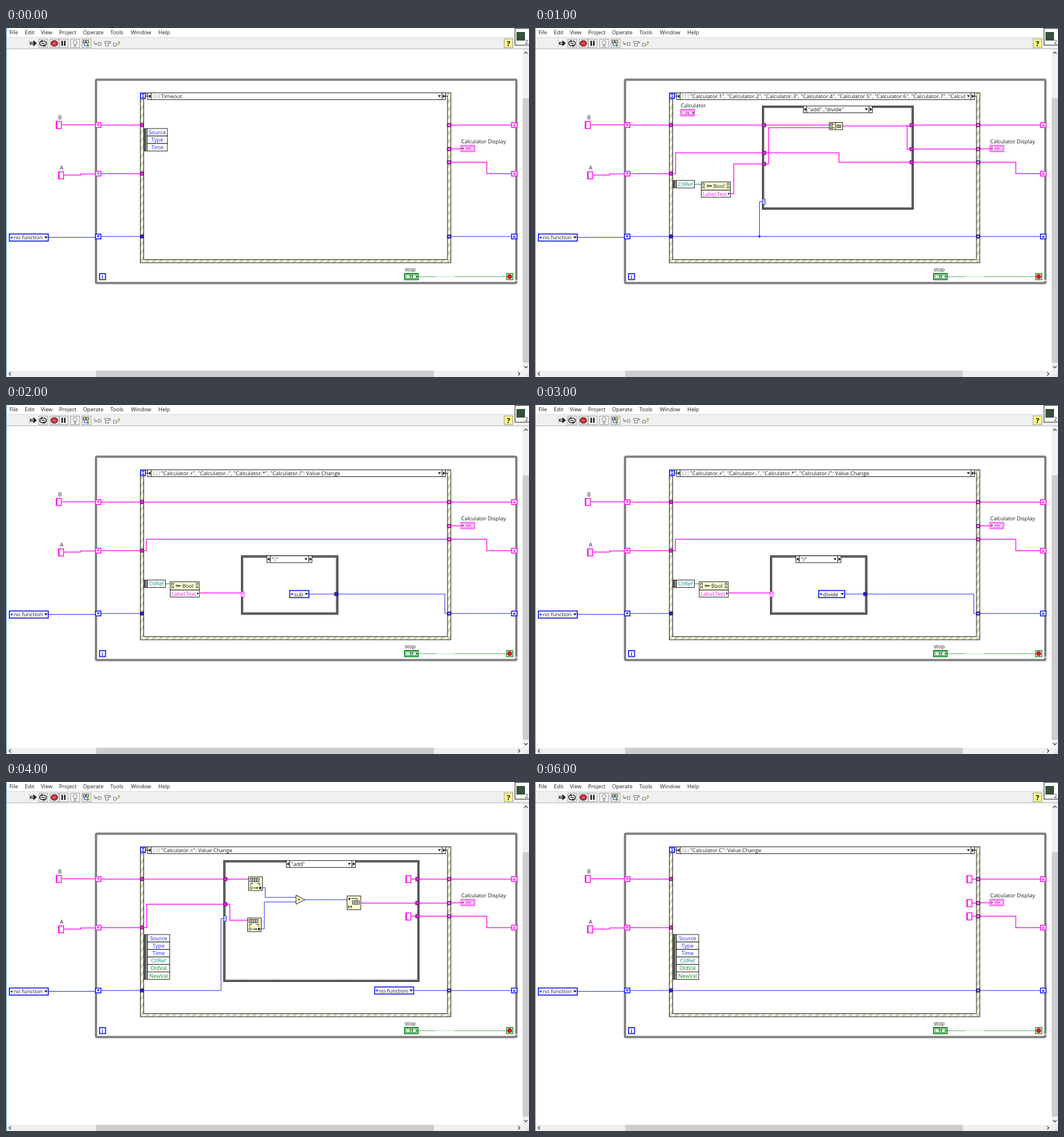
Animation, 917 px wide and 611 px high, one loop 6.5 s. Source, as an HTML page:

```html
<!DOCTYPE html>
<html lang="en">
<head>
<meta charset="utf-8">
<title>Calculator block diagram</title>
<style>
html, body { margin: 0; width: 100%; height: 100%; overflow: hidden; background: #fff; }
svg { display: block; width: 917px; height: 611px; }
text { font-family: "Open Sans", "Noto Sans", sans-serif; font-size: 9.45px; white-space: pre; }
</style>
</head>
<body>
<svg viewBox="0 0 917 611">
  <defs>
    <pattern id="hatch" width="9" height="9" patternUnits="userSpaceOnUse" patternTransform="rotate(40)">
      <rect width="9" height="9" fill="#f8f8e6"/><rect width="4.5" height="9" fill="#d2d2b0"/>
    </pattern>
    <pattern id="check" width="2.6" height="2.6" patternUnits="userSpaceOnUse">
      <rect width="2.6" height="2.6" fill="#333"/>
      <rect width="1.3" height="1.3" fill="#b4b4b4"/><rect x="1.3" y="1.3" width="1.3" height="1.3" fill="#777"/>
    </pattern>
  </defs>
  <g id="frame"></g><g id="scene"></g><g id="ports"></g>
</svg>
<script>
(() => {
const PINK = '#ff1cf0', BLUE = '#1c24f4', TEAL = '#118a8a', GREEN = '#168a24', INK = '#1c1c1c', CREAM = '#ffffd0';
const STEP = 500;
const get = id => document.getElementById(id);

const box = (x, y, w, h, fill = '#fff', stroke = 'none', sw = 1) =>
  `<rect x="${x}" y="${y}" width="${w}" height="${h}" fill="${fill}" stroke="${stroke}" stroke-width="${sw}"/>`;
const line = (pts, color = INK, sw = 1) =>
  `<polyline points="${pts}" fill="none" stroke="${color}" stroke-width="${sw}"/>`;
const poly = (pts, fill = INK, stroke = 'none') => `<polygon points="${pts}" fill="${fill}" stroke="${stroke}"/>`;
const dot = (x, y, r, fill, stroke = 'none') =>
  `<circle cx="${x}" cy="${y}" r="${r}" fill="${fill}" stroke="${stroke}"/>`;
const text = (s, x, y, fill = INK, more = '') => `<text x="${x}" y="${y}" fill="${fill}" ${more}>${s}</text>`;
const mid = (s, x, y, fill, more = '') => text(s, x, y, fill, 'text-anchor="middle" ' + more);
const tiny = (s, x, y, fill, size = 6) => mid(s, x, y, fill, `style="font-size:${size}px;font-weight:700"`);
const str = pts => line(pts, PINK, 1.5);
const num = pts => line(pts, BLUE, 1);

// Triangle pointing right (r), left (l), up (u) or down (d)
function tri(x, y, s, dir, fill = INK) {
  const a = { r: 0, d: 90, l: 180, u: 270 }[dir];
  return `<path d="M${-s * .6} ${-s}L${s * .7} 0L${-s * .6} ${s}Z" fill="${fill}" transform="translate(${x} ${y}) rotate(${a})"/>`;
}
const tunnel = (x, y, color = PINK, hollow) =>
  box(x - 2.9, y - 2.9, 5.8, 5.8, color, '#40104a', 1) + (hollow ? box(x - 1.2, y - 1.2, 2.4, 2.4) : '');
const asker = (x, y, color) => box(x - 2.6, y - 4.4, 5.2, 8.8, '#fff', color) + tiny('?', x, y + 2.6, color, 7);
const register = (x, y, dir, color) =>
  box(x + .8, y - 4.2, 9.6, 8.4, '#fff', color, 1.7) + tri(x + 5.6, y, 2.8, dir, color);
const blank = (x, y) => box(x + 1.2, y - 6.2, 8.8, 12.4, '#fff', PINK, 1.6) + line(`${x + 1.8},${y - 6} ${x + 1.8},${y + 6}`, PINK, 2.4);
const choice = (s, x, y, w) => box(x + .9, y - 6.2, w - 1.8, 12.4, '#fff', BLUE, 1.8) +
  tri(x + 3.7, y, 1.9, 'l', BLUE) + tri(x + 6.3, y, 1.9, 'r', BLUE) + text(s, x + 8.8, y + 3.6) + tri(x + w - 5, y, 2.8, 'd');

function selector(s, x, y, w) {
  return box(x + .5, y + .5, w - 1, 12, '#fff', INK) + line(`${x + 6.5},${y} ${x + 6.5},${y + 12}`) +
    line(`${x + w - 6.5},${y} ${x + w - 6.5},${y + 12}`) + tri(x + 3.4, y + 6.4, 3.2, 'l') +
    tri(x + w - 3, y + 6.4, 3.2, 'r') + tri(x + w - 11, y + 6.4, 2.8, 'd') + text(s, x + 9, y + 10);
}
function caseBox(s, x, y, w, h, sx, sw) {
  return box(x + 2, y + 2, w - 4, h - 4, '#fff', 'url(#check)', 4) +
    box(x + .4, y + .4, w - .8, h - .8, 'none', INK, .8) + selector(s, sx, y, sw);
}
const heading = (n, s) => text(`[${n}]`, 258, 123, '#999') + text(s, 272, 123);

function eventData(names, x, y, w) {
  const h = 13.1;
  let out = box(242.5, y, 2.2, names.length * h, '#888', INK, .8) + box(245.3, y, 2.2, names.length * h, '#ddd', INK, .8);
  names.forEach((n, i) => {
    const color = n === 'CtlRef' ? TEAL : n.endsWith('Val') ? GREEN : BLUE;
    out += box(x, y + i * h, w, h, '#fff', INK) + mid(n, x + w / 2, y + i * h + 10, color);
  });
  return out;
}
const allData = () => eventData(['Source', 'Type', 'Time', 'CtlRef', 'OldVal', 'NewVal'], 248, 267, 39);

function property(x, y) {
  const bits = dx => line(`${x + dx},${y + 7} ${x + dx},${y + 3} ${x + dx + 3},${y + 3} ${x + dx + 3},${y + 7}`) +
    line(`${x + dx},${y + 12} ${x + dx},${y + 9} ${x + dx + 3},${y + 9} ${x + dx + 3},${y + 12}`);
  return box(x + .5, y + .5, 51, 14.5, CREAM, INK) + box(x + .5, y + 15, 51, 12.3, '#fff', INK) +
    bits(3) + bits(46) + dot(x + 12, y + 7.5, 1.6, '#fff', INK) + line(`${x + 13},${y + 7.5} ${x + 19},${y + 7.5}`, INK, 1.8) +
    text('Bool', x + 21.5, y + 11) + text('Label.Text', x + 2.5, y + 24.6, PINK) + tri(x + 49, y + 21, 2.2, 'r');
}
const reference = (y, x) => line(`280,${y} ${x},${y}`, TEAL) + eventData(['CtlRef'], 248, y - 6.6, 31.5);

function joiner(x, y) {
  let out = box(x + .5, y + .5, 23.5, 12.5, CREAM, INK) + line(`${x + 11.5},${y} ${x + 11.5},${y + 13}`);
  for (const dy of [2.4, 8]) out += box(x + 2.5, y + dy, 4, 2.8, '#fff', INK) + line(`${x + 8},${y + dy + 1.4} ${x + 10},${y + dy + 1.4}`);
  return out + box(x + 14, y + 5, 3.5, 4, '#fff', INK) + box(x + 17.5, y + 5, 3.5, 4, '#fff', INK);
}
function converter(x, y, back) {
  const dx = back ? 10 : 3, dy = back ? 9 : 3;
  let out = box(x + .5, y + .5, 24, 24, CREAM, INK);
  for (let i = 0; i < (back ? 3 : 4); i++) out += box(x + dx + i * 4, y + dy, 4, 6, '#fff', INK, .9) + box(x + dx + 1.5 + i * 4, y + dy + 2, 1, 2, INK);
  return out + (back
    ? box(x + 3, y + 4, 3, 3, INK) + line(`${x + 8},${y + 5} ${x + 18},${y + 5} ${x + 18},${y + 8}`) +
      line(`${x + 3},${y + 17} ${x + 3},${y + 22}`) + line(`${x + 3},${y + 19.5} ${x + 8},${y + 19.5}`) + line(`${x + 8},${y + 17} ${x + 8},${y + 22}`)
    : line(`${x + 8},${y + 12} ${x + 4},${y + 12} ${x + 4},${y + 16}`) + line(`${x + 16},${y + 12} ${x + 20},${y + 12} ${x + 20},${y + 16}`) +
      dot(x + 5, y + 20, 2, '#fff', INK) + line(`${x + 9},${y + 20} ${x + 15},${y + 20}`) + tri(x + 16, y + 20, 2, 'r') + box(x + 19, y + 18, 3.5, 4, INK));
}

function drawFrame() {
  let o = box(0, 0, 917, 611);
  o += box(0, 17, 917, 19, '#f0f0f0') + line('0,16.5 892,16.5', '#d8d8d8') + line('0,36.5 917,36.5', '#b0b0b0');
  const menu = { File: 6, Edit: 33, View: 61, Project: 93, Operate: 135, Tools: 183, Window: 219, Help: 267 };
  for (const m in menu) o += text(m, menu[m], 10.6);

  o += line('40.5,19 40.5,35', '#ccc');
  for (const x of [57, 77, 93, 113, 133]) o += box(x + .5, 19.5, 15.5, 15, '#f6f6f6', '#999');
  o += poly('42,24.5 48,24.5 48,21.5 54,26.8 48,32 48,29 42,29') + box(43.5, 25.8, 5, 1.6, '#fff');
  o += line('63,23 61,23 59.5,25 59.5,29 62,31 65,31', INK, 1.5) + line('67,31 69,31 70.5,28.5 70.5,25 68,23 66,23', INK, 1.5) +
    tri(64, 23, 2.6, 'r') + tri(66, 31, 2.6, 'l') + line('62,27 68,27', INK, 1.4);
  o += poly('82,22 87.5,22 90.5,25 90.5,29 87.5,32 82,32 79,29 79,25', '#b83038', '#692025') + box(82, 24.4, 5.5, 5.2, '#d85058');
  o += box(97.2, 22.3, 2.6, 9, INK) + box(101.8, 22.3, 2.6, 9, INK);
  o += dot(121.2, 25.2, 3.5, '#fff', '#777') + box(119.8, 28.8, 2.8, 3.6, '#ddd', '#777', .8);
  o += box(135.5, 22, 4, 4, CREAM, INK) + box(141, 22, 4, 4, CREAM, INK) + line('137,26 137,31 142,31', BLUE) +
    line('142,26 142,29 146,29', GREEN) + tri(144, 31, 2.4, 'r', GREEN);
  o += box(161.5, 25.5, 5, 4.5, '#fff', '#777') + line('155,23 155,28 158,28', '#776') + tri(158.5, 28, 2.2, 'r', '#776');
  o += box(174.5, 27, 5, 4.5, '#fff', '#777') + line('173,27 173,23.5 182,23.5 182,26', '#776') + tri(182, 26, 2.2, 'd', '#776');
  o += box(188.5, 27, 5, 4.5, '#fff', '#777') + line('194,29 198,29 198,25', '#a89640') + tri(198, 24.5, 2.4, 'u', '#a89640');
  o += box(873.5, 19, 15, 15.5, '#fff68a', '#999') + tiny('?', 881, 31.5, INK, 13);
  o += box(892.5, .5, 26, 29.5, '#fff', INK) + box(895, 7, 15, 15, '#35513a') + text('2', 910, 28);

  o += box(906, 37, 11, 574, '#f0f0f0') + box(0, 600, 917, 11, '#f0f0f0') + box(906, 123, 11, 463, '#cdcdcd') + box(158, 600, 592, 11, '#cdcdcd');
  o += line('908.5,45 911.5,42 914.5,45', '#444', 1.4) + line('908.5,592 911.5,595 914.5,592', '#444', 1.4) +
    line('8.5,602.5 5.5,605.5 8.5,608.5', '#444', 1.4) + line('898,602.5 901,605.5 898,608.5', '#444', 1.4);
  for (let i = 0; i < 3; i++) for (let j = 0; j <= i; j++) o += box(915 - j * 2.5, 604 + i * 2.4, 1.2, 1.2, '#b8b8b8');
  o += line('.5,0 .5,611', '#2f8fd6');

  o += `<rect x="157.8" y="90.6" width="737" height="355.8" rx="2" fill="#fff" stroke="#808080" stroke-width="4"/>`;
  o += line('889,441.8 898,441.8', '#fff', 1.6);

  o += text('B', 91.5, 159.5) + text('A', 94.5, 247.5);
  o += str('98,169.5 157,169.5') + str('102,257.5 131,257.5 131,255.5 157,255.5') + num('75,366.5 157,366.5');
  o += blank(87, 169.8) + blank(91, 258) + choice('no function', 5, 366.8, 70);
  o += str('166,170 236,170') + str('166,255 236,255') + num('166,365 236,365');
  o += str('780,170 887,170') + str('780,211.5 798,211.5') + str('780,235 843,235 843,255 887,255') + num('780,365 887,365');
  for (const [y, c] of [[170, PINK], [255, PINK], [365, BLUE]]) o += register(156, y, 'd', c) + register(885.6, y, 'u', c);

  o += text('Calculator Display', 798, 202);
  o += box(797.8, 205.5, 24, 11, '#fff', PINK, 1.2) + box(799.8, 207.5, 20, 7, '#fff', PINK, .8) + tri(801.7, 211, 2, 'r') + tiny('abc', 811, 213.2, PINK, 6.5);
  o += box(164, 430, 10.5, 10.5, '#fff', BLUE, 1.8) + tiny('i', 169.2, 438.8, BLUE, 9.5);
  o += text('stop', 699, 426) + line('723,435.5 877,435.5', '#68ae6d') + line('754,435.5 787,435.5', '#cfe8d0', 1.4);
  o += box(699, 430, 23.5, 10.5, '#fff', GREEN, 2) + box(701.5, 432, 18.5, 6.5, '#e0f3df', GREEN, .8) + tiny('TF', 711, 437.6, '#0c5a16', 6.5) + tri(720, 435.2, 2, 'r', '#0c5a16');
  o += box(877.6, 429.8, 11, 10.8, '#f2f6dc', GREEN, 1.4) + dot(883.1, 435.2, 3.7, '#f01818', '#981010');

  o += box(235.5, 113.5, 544.5, 297.5, 'url(#hatch)', INK) + box(241.5, 119.5, 532.5, 286, '#fff', INK);
  return o + selector('', 248, 113, 523) + line('245,119.5 248,119.5') +
    box(236, 114, 8.5, 9.5, '#fff', BLUE, 1.8) + poly('237.8,115.5 242.7,115.5 238,122 242.7,122', BLUE);
}

function drawPorts() {
  let o = '';
  for (const y of [170, 255]) o += tunnel(238.3, y);
  for (const y of [170, 212, 235]) o += tunnel(777, y, PINK, true);
  return o + tunnel(238.3, 365, BLUE) + tunnel(777, 365, BLUE, true);
}

const timeout = () => heading(0, 'Timeout') + eventData(['Source', 'Type', 'Time'], 247.5, 176, 35.5);

function digits(idle) {
  const keys = [1, 2, 3, 4, 5, 6, 7].map(n => `"Calculator.${n}", `).join('');
  let o = heading(1, keys + '"Calcul') + text('Calculator', 255.5, 139);
  o += box(255.8, 142.8, 23.5, 10.8, '#fff', PINK, 1.5) + box(258, 145, 19, 6.4, '#ffe4fb', PINK, .8) + tiny('F5', 267, 150.5, '#b010a0') + tri(277.5, 148.3, 1.9, 'r');
  o += caseBox(idle ? '"no function", Default' : '"add".."divide"', 398, 136, 266, 182, 470, 122);
  o += str('241,170 402,170') + str('241,255 246.5,255 246.5,218.5 402,218.5') + str('343,290 348.5,290 348.5,238 402,238');
  if (idle) {
    o += str('402,170 660,170') + str('402,218.5 517,218.5') + str('402,238 409.5,238 409.5,223 517,223') +
      str('540,220.5 652.5,220.5 652.5,235 660,235') + str('652.5,220.5 652.5,212 660,212') + dot(652.5, 220.5, 1.6, PINK) + joiner(516, 214);
  } else {
    o += str('402,170 517,170') + str('402,238 409.5,238 409.5,174.5 517,174.5') + str('540,171.5 657,171.5') +
      str('652.5,171.5 652.5,212 660,212') + dot(652.5, 171.5, 1.6, PINK) + str('402,218.5 533,218.5 533,235 660,235') + joiner(515.5, 165);
  }
  for (const y of [170, 212, 235]) o += str(`660,${y} 777,${y}`) + tunnel(660.3, y);
  for (const y of [170, 218.5, 238]) o += tunnel(401.8, y);
  o += num('241,365 777,365') + num('393.5,365 393.5,304 398,304') + dot(393.5, 365, 2, BLUE) + asker(401, 304, BLUE);
  return o + reference(273.5, 292) + property(291, 269);
}

function operator(sign, name, w) {
  let o = heading(2, '"Calculator.+", "Calculator.-", "Calculator.*", "Calculator./": Value Change');
  o += str('241,170 777,170') + str('241,255 246,255 246,235 777,235');
  o += caseBox(`"${sign}"`, 412, 263.5, 170.5, 103.5, 457, 80);
  o += str('340,329 414,329') + asker(415, 331.5, PINK) + num('530,331 769.5,331 769.5,365 777,365');
  return o + choice(name, 496.5, 331, w) + tunnel(579, 331, BLUE) + reference(313, 288) + property(287.5, 309);
}

function equals(name, sign) {
  let o = heading(3, '"Calculator.=": Value Change') + allData();
  o += caseBox(sign ? `"${name}"` : `"${name}", Default`, 381, 137, 344, 213, 491, 122);
  o += str('241,170 385,170') + str('241,255 246.5,255 246.5,214 385,214') + num('241,365 377,365 377,239 382,239');
  if (sign) {
    o += str('385,170 425,170') + str('387,214 392.5,214 392.5,242 424,242');
    o += num('449,185 454.5,185 454.5,202 509,202') + num('448,257 453,257 453,210 509,210') + num('523,206 598,206');
    o += str('622,212 721,212') + str('711,170 721,170') + str('711,235 721,235') + blank(700, 170) + blank(700, 235.5);
    o += converter(425, 165.5) + converter(423, 237.5) + converter(597.5, 199, true);
    o += poly('508.5,198 524,206 508.5,214', CREAM, INK) + tiny(sign, 513.8, 209, INK, 8);
  } else {
    o += str('385,170 721,170') + str('385,214 645,214 645,235 721,235') + str('645,214 645,212 721,212') + dot(645, 214, 1.6, PINK);
  }
  for (const y of [170, 212, 235]) o += str(`721,${y} 777,${y}`) + tunnel(721.3, y);
  o += tunnel(384.5, 170) + tunnel(384.5, 214) + asker(384, 239, BLUE);
  return o + num('715,365 777,365') + choice('no function', 645.5, 365, 70);
}

function reset() {
  let o = heading(4, '"Calculator.C": Value Change') + allData() + num('241,365 777,365');
  for (const y of [170, 212, 235]) o += str(`766,${y} 777,${y}`) + blank(756, y + .3);
  return o;
}

const scenes = [
  timeout(), digits(true), digits(false),
  operator('+', 'add', 36), operator('-', 'sub', 35.5), operator('*', 'mul', 36), operator('/', 'divide', 47.5),
  equals('no function'), equals('add', '+'), equals('sub', '−'), equals('mul', '×'), equals('divide', '÷'),
  reset()
];
get('frame').innerHTML = drawFrame();
get('ports').innerHTML = drawPorts();

let shown = -1;
function draw(t) {
  const i = Math.floor(t / STEP) % scenes.length;
  if (i !== shown) get('scene').innerHTML = scenes[shown = i];
}
const start = performance.now();
function tick() {
  draw(Math.max(0, performance.now() - start));
  requestAnimationFrame(tick);
}
tick();
})();
</script>
</body>
</html>
```
